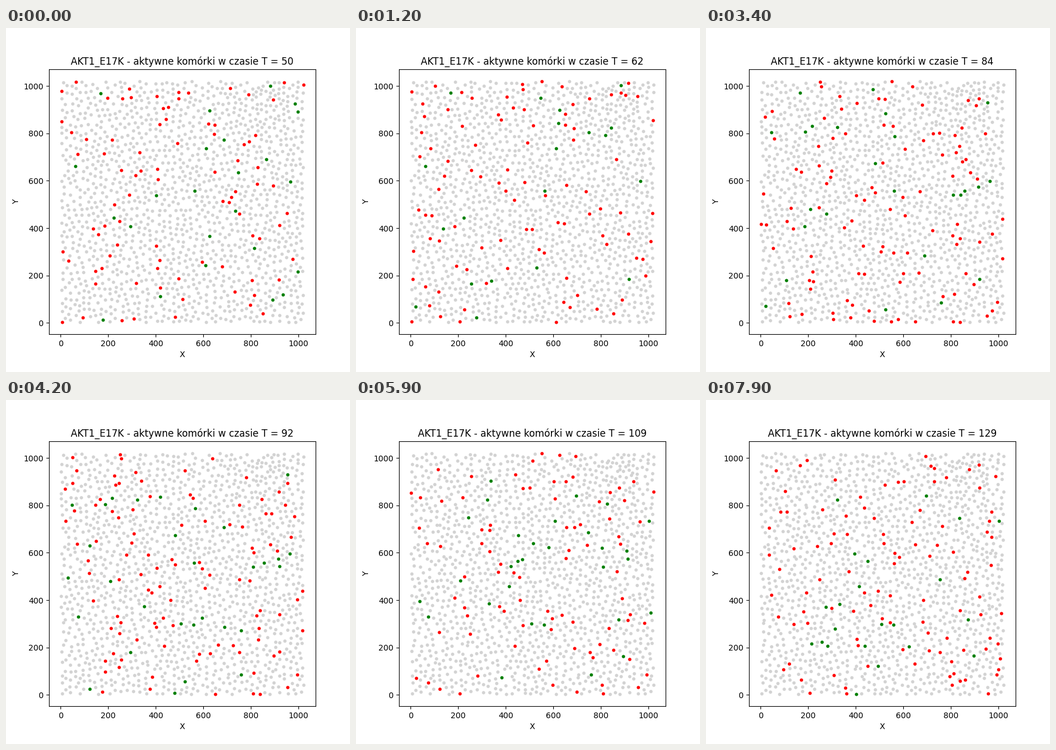
A matplotlib script for the animation above (8000 ms loop, 600 px wide and 600 px high).

```python
import numpy as np
import matplotlib.pyplot as plt
from matplotlib.animation import FuncAnimation

FRAMES, T0, N_CELLS = 80, 50, 1450
LOW, HIGH = 2.5, 1020
OFF, RED, GREEN = range(3)
COLORS = {OFF: "lightgray", RED: "red", GREEN: "green"}

# Chance per step of leaving a state, and the share of leavers that go to
# the next state in the cycle off -> red -> green -> off
LEAVE = np.array([0.0082, 0.12, 0.08])
FORWARD = np.array([0.92, 0.12, 0.62])

# Local bursts spreading outwards: x, y, first T
BURSTS = [(370, 100, 95), (175, 290, 95), (125, 500, 114)]
BURST_RADIUS, BURST_SPEED = 55, 18


def spacing(p):
    """Smallest allowed gap between cells; tighter in the crowded corner."""
    crowd = np.exp(-np.sum(((p - (870, 950)) / 100) ** 2))
    return 20 - 5 * crowd


def place_cells(rng):
    cells = np.zeros((N_CELLS, 2))
    count = 0
    while count < N_CELLS:
        p = rng.uniform(LOW, HIGH, 2)
        gap = ((cells[:count] - p) ** 2).sum(axis=1).min(initial=np.inf)
        if gap > spacing(p) ** 2:
            cells[count] = p
            count += 1
    return cells


def simulate_states(rng, cells):
    states = np.zeros((FRAMES, N_CELLS), int)
    current = rng.choice(3, N_CELLS, p=[0.914, 0.065, 0.021])
    for t in range(FRAMES):
        states[t] = current
        leaves = rng.random(N_CELLS) < LEAVE[current]
        forward = rng.random(N_CELLS) < FORWARD[current]
        current = (current + leaves * np.where(forward, 1, 2)) % 3

    for x, y, first in BURSTS:
        dist = np.hypot(*(cells - (x, y)).T)
        for cell in np.flatnonzero(dist < BURST_RADIUS):
            if rng.random() < 0.6:
                start = first - T0 + int(dist[cell] / BURST_SPEED)
                states[start:start + rng.integers(6, 11), cell] = RED
    return states


rng = np.random.default_rng(17)
cells = place_cells(rng)
states = simulate_states(rng, cells)
drift = rng.normal(0, 0.3, (FRAMES, N_CELLS, 2)).cumsum(axis=0)
tracks = np.clip(cells + drift, LOW, HIGH)

fig, ax = plt.subplots(figsize=(6, 6), dpi=100)
ax.set(xlim=(-49.1, 1071.1), ylim=(-47.7, 1070.9), xlabel="X", ylabel="Y")
title = ax.set_title("")
dots = {state: ax.scatter([], [], s=10, c=color) for state, color in COLORS.items()}


def update(frame):
    for state, dot in dots.items():
        dot.set_offsets(tracks[frame, states[frame] == state])
    title.set_text(f"AKT1_E17K - aktywne komórki w czasie T = {T0 + frame}")
    return [*dots.values(), title]


anim = FuncAnimation(fig, update, frames=FRAMES, interval=100, repeat=True,
                     repeat_delay=0, init_func=lambda: update(0))
plt.show()
```
